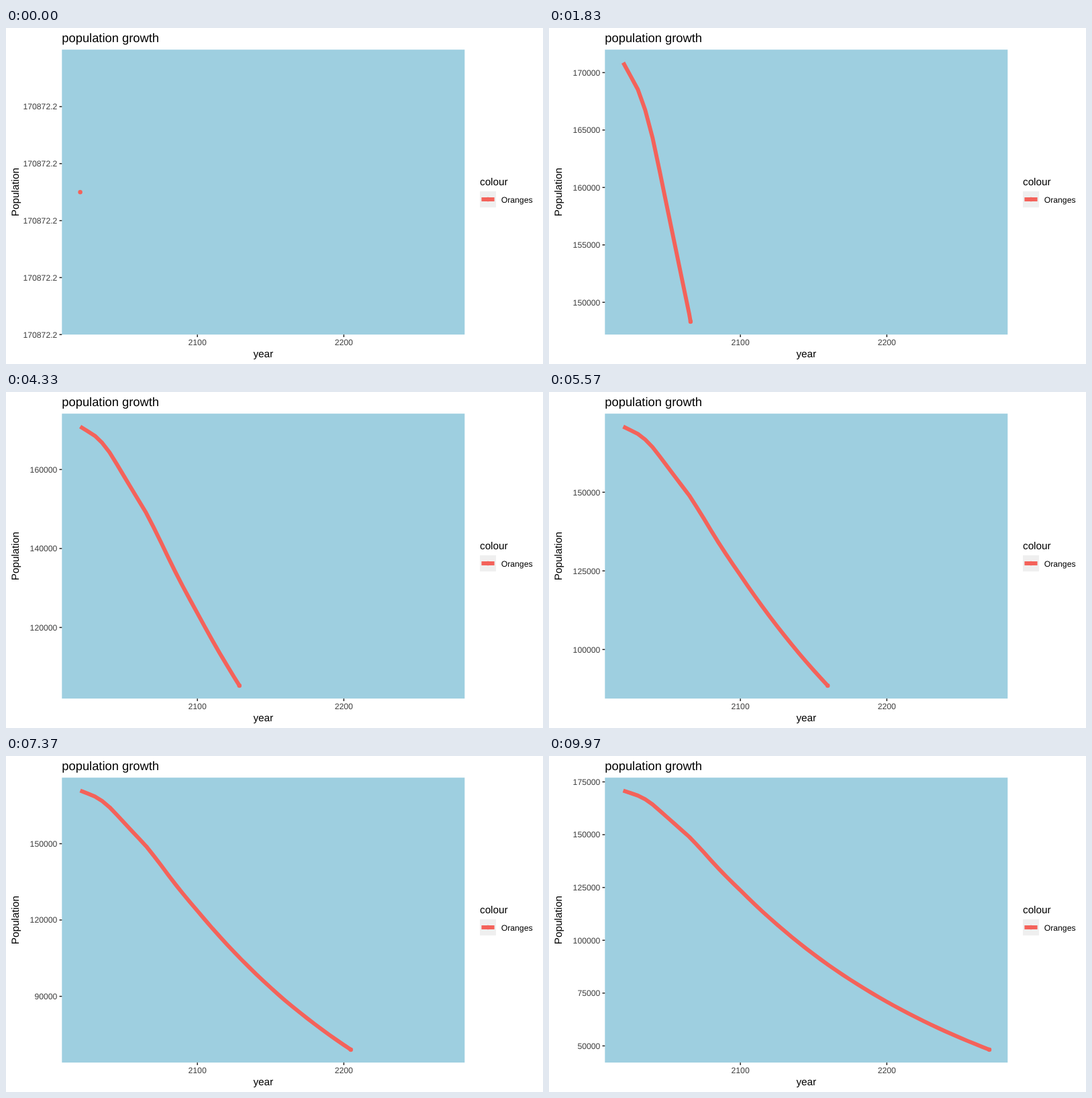
Recreate the animation shown at these times as an HTML page. Size 800 by 500 pixels, loop 10000 ms.

```html
<!DOCTYPE html>
<html lang="en">
<head>
<meta charset="utf-8">
<title>population growth</title>
<style>
  html, body { margin: 0; width: 100%; height: 100%; overflow: hidden; background: #fff; }
  svg { display: block; width: 800px; height: 500px; }
  text { font: 12.22px "Liberation Sans", Arial, sans-serif; text-rendering: geometricPrecision; }
  .title { font-size: 18.33px; }
  .name { font-size: 15.28px; }
  .label { fill: #3b3b3b; }
  .end { text-anchor: end; }
  .mid { text-anchor: middle; }
  .tick { stroke: #242424; stroke-width: 1.48; }
  .line { fill: none; stroke: #f4625a; stroke-width: 5.93; stroke-linejoin: round; }
  .dot { fill: #f4625a; }
</style>
</head>
<body>
<svg viewBox="0 0 800 500">
  <rect x="83.3" y="32.2" width="600" height="424" fill="#9ecfe0"/>
  <text class="title" x="83.3" y="21">population growth</text>
  <text class="name mid" x="383.3" y="490">year</text>
  <text class="name mid" transform="translate(18.5 244.2) rotate(-90)">Population</text>
  <g id="xAxis"></g>
  <g id="yAxis"></g>
  <path id="curve" class="line"/>
  <circle id="dot" class="dot" r="3.2"/>
  <text class="name" x="706" y="234">colour</text>
  <rect x="706" y="243" width="24" height="24" fill="#efefef"/>
  <path class="line" d="M708.4 255H727.6"/>
  <circle class="dot" cx="718" cy="255" r="3.2"/>
  <text x="737.7" y="259.8">Oranges</text>
</svg>
<script>
const LOOP = 10000, FRAMES = 300;
const START = 2020, END = 2270, STEP = 5;
const LEFT = 83.3, TOP = 32.2, BOTTOM = 456.2;
const PAD = (BOTTOM - TOP) / 22;
const $ = id => document.getElementById(id);

// Population every five years up to 2100, then exponential decline.
const pop = [170872.2, 169710, 168532, 166750, 164350, 161350, 158250, 155170, 152090,
  149030, 145430, 141680, 137800, 134050, 130450, 127000, 123620];
for (let year = 2105; year <= END; year += STEP) {
  pop.push(pop[pop.length - 1] * Math.exp(-STEP * (year <= 2160 ? 0.0056 : 0.0055)));
}
const FIRST = pop[0];

const xOf = year => LEFT + 600 / 22 + (year - START) / (END - START) * 600 / 1.1;

function valueAt(year) {
  const p = (year - START) / STEP;
  const i = Math.min(Math.floor(p), pop.length - 2);
  return pop[i] + (pop[i + 1] - pop[i]) * (p - i);
}

// Extended Wilkinson tick search, aiming for five labels.
function breaks(lo, hi) {
  const Q = [1, 5, 2, 2.5, 4, 3], m = 5, range = hi - lo;
  const score = (s, c, d) => 0.25 * s + 0.2 * c + 0.5 * d + 0.05;
  const cover = (a, b) => 1 - 0.5 * (a * a + b * b) / (0.1 * range) ** 2;
  let best = -2, found = null;

  search:
  for (let j = 1; j < 20; j++) {
    for (let i = 0; i < Q.length; i++) {
      const q = Q[i], simple = 1 - i / (Q.length - 1) - j;
      if (score(simple + 1, 1, 1) < best) break search;
      for (let k = 2; k < 40; k++) {
        const dMax = k >= m ? 2 - (k - 1) / (m - 1) : 1;
        if (score(simple + 1, 1, dMax) < best) break;
        let z = Math.ceil(Math.log10(range / (k + 1) / j / q));
        for (const last = z + 12; z < last; z++) {
          const step = j * q * 10 ** z, span = step * (k - 1);
          const half = Math.max(0, (span - range) / 2);
          if (score(simple + 1, cover(half, half), dMax) < best) break;
          const from = Math.floor(hi / step) * j - (k - 1) * j;
          const to = Math.ceil(lo / step) * j;
          for (let s = from; s <= to; s++) {
            const a = s * step / j, b = a + span;
            const r = (k - 1) / span;
            const rt = (m - 1) / (Math.max(b, hi) - Math.min(a, lo));
            const zero = a <= 0 && b >= 0 && s % j === 0 ? 1 : 0;
            const total = score(simple + zero, cover(hi - b, lo - a), 2 - Math.max(r / rt, rt / r));
            if (total > best) {
              best = total;
              found = { a, step, k };
            }
          }
        }
      }
    }
  }
  return Array.from({ length: found.k }, (_, n) => found.a + n * found.step)
    .filter(v => v >= lo && v <= hi);
}

const yTick = (y, label) =>
  `<path class="tick" d="M79.5 ${y}H${LEFT}"/>` +
  `<text class="label end" x="76.4" y="${y + 4.4}">${label}</text>`;

$('xAxis').innerHTML = [2100, 2200].map(year =>
  `<path class="tick" d="M${xOf(year)} ${BOTTOM}v3.82"/>` +
  `<text class="label mid" x="${xOf(year)}" y="472.1">${year}</text>`).join('');

function draw(frame) {
  const year = START + (END - START) * frame / (FRAMES - 1);
  const now = valueAt(year), drop = FIRST - now;
  $('dot').setAttribute('cx', xOf(year));

  if (frame === 0) {
    $('dot').setAttribute('cy', (TOP + BOTTOM) / 2);
    $('curve').setAttribute('d', '');
    $('yAxis').innerHTML = [1, 2, 3, 4, 5].map(n =>
      yTick(TOP + n * (BOTTOM - TOP) / 5, FIRST)).join('');
    return;
  }

  const yOf = v => TOP + PAD + (FIRST - v) / drop * (BOTTOM - TOP - 2 * PAD);
  const points = [];
  for (let y = START; y < year; y += STEP) points.push([xOf(y), yOf(valueAt(y))]);
  points.push([xOf(year), yOf(now)]);
  $('curve').setAttribute('d', 'M' + points.join('L'));
  $('dot').setAttribute('cy', yOf(now));
  $('yAxis').innerHTML = breaks(now - drop / 20, FIRST + drop / 20)
    .map(v => yTick(yOf(v), +v.toFixed(1))).join('');
}

let shown = -1;
function tick() {
  const t = Math.floor(performance.now() % LOOP / 10) * 10;
  const frame = Math.min(FRAMES - 1, Math.floor((t + 3.4) * FRAMES / LOOP));
  if (frame !== shown) draw(shown = frame);
  requestAnimationFrame(tick);
}
tick();
</script>
</body>
</html>
```
